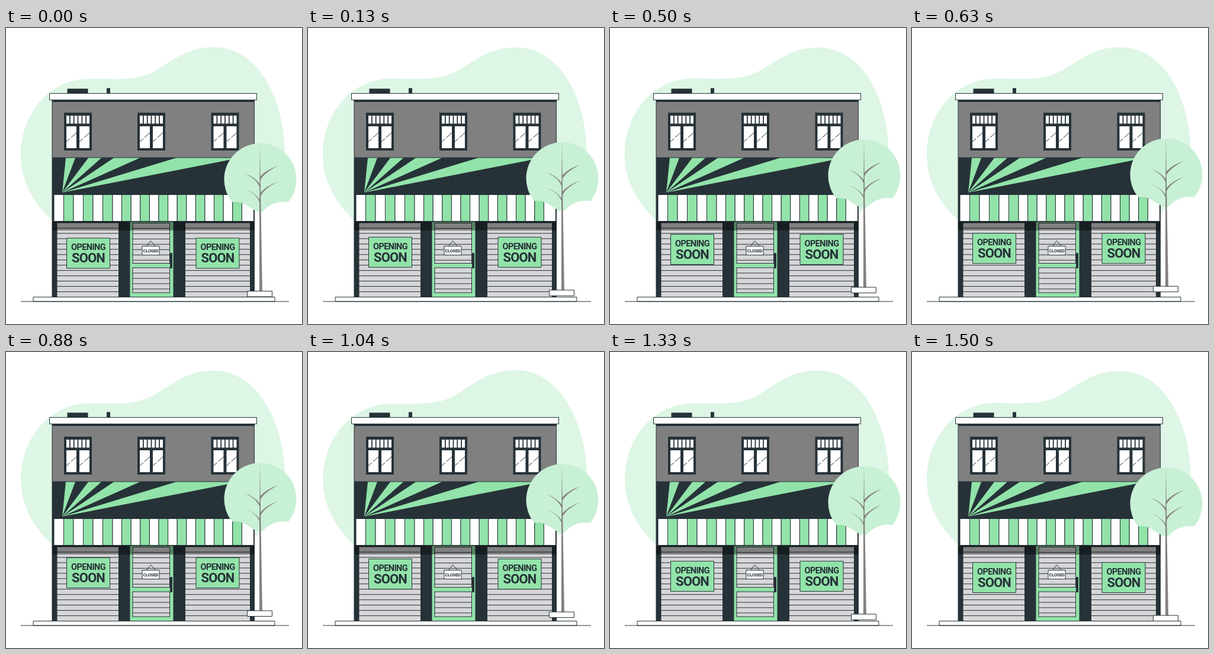
Animation of 500x500 px, one loop 1540 ms. Source, as an HTML page:

```html
<!DOCTYPE html>
<html lang="en">
<head>
<meta charset="utf-8">
<style>
  html, body { margin: 0; height: 100%; overflow: hidden; background: #fff; }
  svg { display: block; width: 100%; height: 100%; }
  text { font-family: Roboto, "Open Sans", sans-serif; font-weight: 700; font-stretch: 75%; letter-spacing: -.04em; text-anchor: middle; fill: #263238; }
  .dark { fill: #263238; }
  .green { fill: #92e3a9; }
  .white { fill: #fff; }
  .line { stroke: #263238; stroke-width: 1; }
</style>
</head>
<body>
<svg viewBox="0 0 500 500">
  <path id="blob" fill="#def6e5" d="M25 215C25 145 74 86 140 86C190 86 222 90 254 71C284 53 308 32 350 32C432 32 471 130 471 212C471 262 440 300 400 330L84 330C50 302 25 262 25 215Z"/>

  <g id="facade">
    <path class="dark" d="M103.500 102.500h35v8h-35zM170 101.500h6v9h-6z"/>
    <path class="dark" d="M77.500 121h342.500v334h-342.500z"/>
    <path fill="#808080" d="M78.500 125h340.500v93.500h-340.500z"/>
    <path class="white line" d="M73.500 110.500h350v11h-350z"/>
    <path class="green" d="M101 219.500H117L95 278ZM139 219.500H161L95 278ZM182 219.500H226L95 278ZM287 219.500H394L95 278Z"/>
  </g>

  <path class="green" d="M209.500 327.500h73v127h-73z"/>
  <g id="shutters"></g>
  <path opacity=".4" d="M78 327h342v15H78z"/>
  <g id="awning"></g>
  <rect class="dark" x="277" y="380" width="4" height="26" rx="1"/>

  <path class="line" fill="none" d="M237 369L244.500 359.500L253 369"/>
  <path class="white line" d="M230 368.500h29v15h-29z"/>
  <text x="244.500" y="379" font-size="7.500">CLOSED</text>

  <path class="white line" d="M46 454.500h408v7.500H46z"/>
  <path class="line" d="M25 462H478"/>

  <g id="floating">
    <g id="sign">
      <path class="green line" d="M102.500 355.500h73v51h-73z"/>
      <text x="139" y="376" font-size="14.500">OPENING</text>
      <text x="139" y="397" font-size="22">SOON</text>
    </g>
    <use href="#sign" x="218.500"/>
    <path fill="#c8f0d5" d="M382 294.500A61 61 0 1 1 477 294.500Q451 291 433 311Q425 313 411 303Q396 292 382 294.500Z"/>
    <path fill="#858280" d="M429 196L430.500 300L433 445H428L428 300Z"/>
    <path fill="#858280" d="M402 246Q424 255 429.500 272V265Q419 251 402 246ZM402 272Q424 280 429 297V291Q419 277 402 272ZM460 233Q434 246 429 259V252Q439 240 460 233ZM460 260Q434 272 429 287V280Q439 267 460 260Z"/>
    <path class="white line" d="M407.500 445h42v9.500h-42z"/>
  </g>
</svg>
<script>
const LOOP = 1540, LEAD = 42, SLAT = 8.96;
const get = id => document.getElementById(id);
const add = (id, markup) => get(id).insertAdjacentHTML("beforeend", markup);
const rect = (cls, x, y, w, h) => `<rect class="${cls}" x="${x}" y="${y}" width="${w}" height="${h}"/>`;

for (const x of [98, 222, 346.5]) {
  let panes = rect("dark", x, 143, 47, 64);
  for (let i = 0; i < 6; i++) panes += rect("white", x + 4 + i * 6.8, 148, 5, 13.5);
  for (const left of [x + 4, x + 26]) {
    panes += rect("white", left, 166, 17, 37);
    panes += `<path class="line" d="M${left} 192l6 -5m2 -2l9 -8"/>`;
  }
  add("facade", panes);
}

function shutter(x, y, w, h) {
  let d = "";
  for (let dy = SLAT; dy < h - 2; dy += SLAT) d += `M${x} ${y + dy}h${w}`;
  add("shutters", `<g fill="#d6d6d8">${rect("line", x, y, w, h)}<path class="line" d="${d}"/></g>`);
}
shutter(86, 329, 104.5, 125.5);
shutter(302.5, 329, 110, 125.5);
shutter(214, 329.5, 62.5, 68);
shutter(214, 405, 62.5, 42);

const stripeEdge = i => i < 6 ? 81 + 16.5 * i : 180 + 15.6 * (i - 6);
for (let i = 0; i < 21; i++) {
  const x = stripeEdge(i), end = i < 20 ? stripeEdge(i + 1) : 418.5;
  add("awning", rect((i % 2 ? "green" : "white") + " line", x, 281.5, end - x, 45));
}

// Triangle wave: 0 at phase 0, 1 at phase 0.5
const triangle = p => 1 - Math.abs(1 - 2 * (p % 1));

function draw(now) {
  const phase = (now + LEAD) / LOOP;
  get("floating").setAttribute("transform", `translate(0 ${-10 * triangle(phase)})`);
  get("blob").setAttribute("transform", `rotate(${2 * triangle(phase + 0.25) - 1} 248 190)`);
  requestAnimationFrame(draw);
}
draw(0);
</script>
</body>
</html>
```
